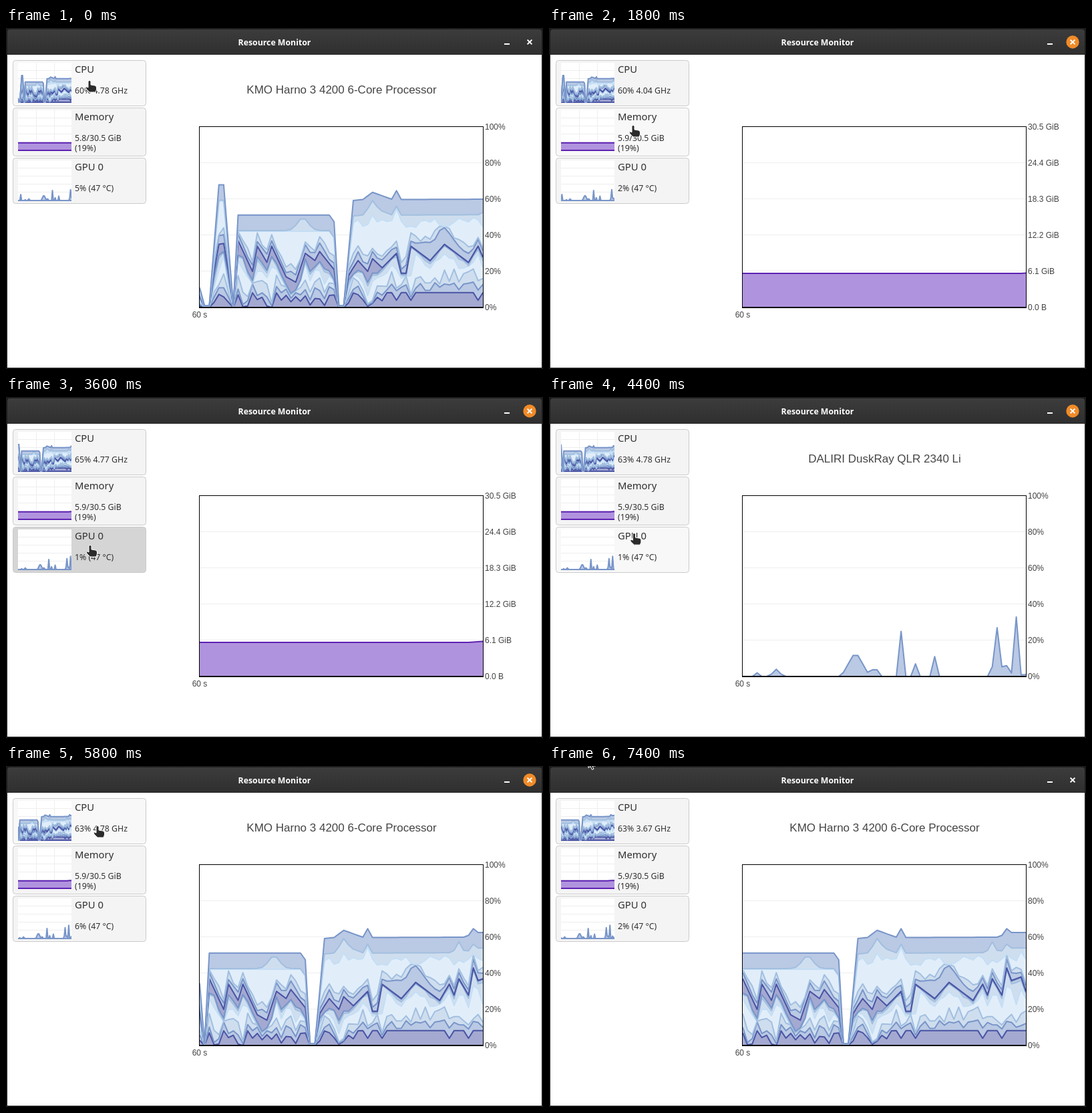
Animation of 804 by 510 pixels, one loop 7.5 s. Source, as an HTML page:

```html
<!DOCTYPE html>
<html lang="en">
<head>
<meta charset="utf-8">
<title>Resource Monitor</title>
<style>
  html, body { margin: 0; width: 100%; height: 100%; overflow: hidden; background: #1b1b1b; }
  svg { display: block; }
  .ui { font-family: "Noto Sans", sans-serif; fill: #303030; }
  .plot { font-family: "Liberation Sans", Arial, sans-serif; fill: #444; font-size: 12px; }
</style>
</head>
<body>
<svg id="stage" width="804" height="510" viewBox="0 0 804 510">
  <defs>
    <linearGradient id="bar" x2="0" y2="1">
      <stop stop-color="#3c3c3c"/><stop offset="1" stop-color="#2f2f2f"/>
    </linearGradient>
  </defs>
  <rect width="804" height="510" fill="#1b1b1b"/>
  <path d="M2 40V6q0-4 4-4H798q4 0 4 4V40z" fill="url(#bar)"/>
  <rect x="2" y="39" width="800" height="1" fill="#262626"/>
  <rect x="2" y="40" width="800" height="468" fill="#fff"/>
  <text class="ui" x="402" y="25.5" text-anchor="middle" font-size="12.3" font-weight="600" style="fill:#fff">Resource Monitor</text>
  <rect x="746" y="23" width="8" height="2" fill="#fff"/>
  <circle id="close" cx="784" cy="21" r="9.7" fill="#f08b28"/>
  <path d="M780.6 17.6l6.8 6.8m0-6.8l-6.8 6.8" stroke="#fff" stroke-width="2"/>
</svg>
<script>
const LOOP = 7500, COUNT = 60, TOTAL = 68;
const TICKS = [200, 1200, 2200, 3300, 4300, 5300, 6400, 7400];
const VIEWS = [[0, 0], [1700, 1], [3700, 2], [5800, 0]];
const PRESSES = [[3600, 2], [5700, 0]];
const GHZ = ["4.78", "4.77", "4.04", "4.77", "4.77", "4.78", "4.78", "4.77", "3.67"];
const POINTER = [[800, 125, 79], [1200, 125, 136], [1400, 126, 146], [2300, 126, 146],
  [2400, 126, 151], [2600, 126, 151], [3100, 126, 222], [4300, 126, 222], [5000, 136, 97],
  [5200, 137, 90], [6700, 137, 90], [7400, 59, -10]];

// Line and fill colours.
const DARK = ["#4a54a4", "#a4a9d1"], MED = ["#7895c9", "#bac9e4"];
const LIGHT = ["#a2bfe0", "#cfdeee"], PALE = ["#c4def5", "#e1eefa"];
const VIOLET = ["#5e22b3", "#b093de"];
const RAMP = [DARK, MED, LIGHT, PALE, LIGHT, MED];

// Turning points of the whole load and of its lower half: [sample, percent].
const LOAD = [[0, 11], [1, 1], [2, 1], [4, 68], [5, 68], [7, 1], [8, 51.2], [27, 51.2], [28, 47.5],
  [29, 1], [30, 1], [32, 59.3], [34, 59.8], [36, 63.8], [40, 60], [41, 64.7], [42, 59.8], [61, 60],
  [62, 61], [63, 64.7], [64, 62.6], [67, 62.6]];
const HALF = [[4, 35], [8, 37], [11, 20], [12, 34], [14, 25], [15, 34], [18, 17], [20, 14], [22, 30],
  [24, 26], [25, 31], [28, 21], [32, 22], [33, 26], [35, 20], [36, 27], [38, 22], [41, 30], [42, 19],
  [43, 19], [44, 34], [48, 26], [51, 35], [56, 25], [58, 34], [59, 28], [60, 37], [62, 28], [63, 43],
  [64, 36], [66, 38], [67, 30]];
// Bursts: [sample, percent, half width].
const BURSTS = [[3, 15, 1], [8, 2, 1], [12, 4, 1.5], [28.5, 14, 3], [32.5, 5.5, 1.5], [38, 25, 1],
  [41, 7, 1], [45, 11, 1], [58, 27, 1.25], [60, 6, 1.5], [62, 33, 1.03], [65, 6, 1.2], [66.5, 2.5, 2.5]];

function at(keys, x, n = 1) {
  let k = 0;
  while (k < keys.length - 2 && keys[k + 1][0] <= x) k++;
  const a = keys[k], b = keys[k + 1];
  return a[n] + (b[n] - a[n]) * Math.min(1, Math.max(0, (x - a[0]) / (b[0] - a[0])));
}

let seed = 11;
const rand = () => (seed = seed * 16807 % 2147483647) / 2147483647;
const between = (lo, hi) => lo + (hi - lo) * rand();
const bump = (x, mid, width) => Math.exp(-(((x - mid) / width) ** 2));

// Twelve stacked core levels for one sample, lowest first.
function cores(i) {
  const top = at(LOAD, i), half = at(HALF, i), late = i > 29;
  const calm = 1 - 0.85 * bump(i, 35.3, 1.7);
  const v = [];
  v[0] = calm * (!late ? between(0, 8.2) : rand() < 0.2 ? 4 : 8.2);
  v[1] = v[0] + calm * between(1, 6);
  v[2] = v[1] + calm * between(1, 8);
  v[5] = half - (i < 38 ? between(3, 8) : 0.4);
  v[4] = v[5] - between(0, 2);
  v[3] = v[2] + (v[4] - v[2]) * between(0.4, 0.9);
  v[6] = half;
  v[7] = half + between(2, 5) + 7 * bump(i, 50, 3.5);
  v[8] = v[7] + between(0.5, 5);
  v[9] = top - (late ? between(10, 17) : 9);
  v[10] = top - 8.6 + 7 * bump(i, 21.5, 1.6) + 4 * bump(i, 36, 1) + 6 * bump(i, 60, 0.8);
  v[11] = top;
  if (top < 40) return v.map((_, k) => top * (k + 1) / 12);
  for (let k = 10; k >= 0; k--) v[k] = Math.min(v[k], v[k + 1]);
  return v;
}

const samples = rule => Array.from({ length: TOTAL }, (_, i) => rule(i));
const cpu = samples(cores);
const gpu = samples(i => Math.max(0, ...BURSTS.map(([mid, h, w]) => h * (1 - Math.abs(i - mid) / w))));
const mem = samples(i => 18.9 + Math.min(0.5, 0.2 * Math.max(0, i - 60)));
const SETS = [
  cpu[0].map((_, k) => [cpu.map(v => v[k]), RAMP[k % 6]]),
  [[mem, VIOLET]],
  [[gpu, MED]]
];

const stage = document.getElementById("stage"), closeDot = document.getElementById("close");
function add(tag, attrs, parent = stage, text = "") {
  const el = document.createElementNS("http://www.w3.org/2000/svg", tag);
  for (const name in attrs) el.setAttribute(name, attrs[name]);
  el.textContent = text;
  parent.append(el);
  return el;
}

// A plot box; each curve fills the band down to the one below it.
function makePlot(x, y, w, h, rows, cols) {
  const id = "clip" + x + "_" + y;
  add("rect", { x, y, width: w, height: h + 1 }, add("clipPath", { id }));
  add("rect", { x, y, width: w, height: h, fill: "#fff" });
  for (let r = 1; r < rows; r++)
    add("rect", { x, y: Math.round(y + h * r / rows) - 1, width: w, height: 1, fill: "#eee" });
  for (const cx of cols) add("rect", { x: cx, y, width: 1, height: h, fill: "#eee" });
  const group = add("g", { "clip-path": `url(#${id})`, "stroke-width": 2, "stroke-linejoin": "round" });
  const floor = [[x, y + h], [x + w, y + h]];
  return (set, shift) => {
    group.replaceChildren();
    const lines = set.map(([row]) => row.slice(shift, shift + COUNT)
      .map((v, i) => [x + i * w / (COUNT - 1), y + h * (1 - v / 100)]));
    lines.forEach((line, k) => {
      const below = k ? lines[k - 1] : floor;
      add("polygon", { points: [...line, ...[...below].reverse()].join(" "), fill: set[k][1][1] }, group);
    });
    const stroke = (line, color) => add("polyline", { points: line.join(" "), fill: "none", stroke: color }, group);
    stroke(floor, set[0][1][0]);
    lines.forEach((line, k) => stroke(line, set[k][1][0]));
  };
}

const CARDS = [["CPU", 48, 69, 52, 59, 5, [45, 72]], ["Memory", 119, 73, 123, 60, 5, [45, 72]],
  ["GPU 0", 194, 69, 198, 60, 5, []]];
const cards = CARDS.map(([name, top, height, plotTop, plotHeight, rows, cols]) => {
  const box = add("rect", { x: 10.5, y: top + 0.5, width: 199, height: height - 1, rx: 4, stroke: "#cbcbcb" });
  const draw = makePlot(18, plotTop, 80, plotHeight, rows, cols);
  add("text", { class: "ui", x: 103, y: top + 19, "font-size": 14.8 }, stage, name);
  const label = add("text", { class: "ui", x: 103, y: top + 50, "font-size": 12.3 });
  return { top, height, box, draw, label };
});
add("text", { class: "ui", x: 103, y: 184, "font-size": 12.3 }, stage, "(19%)");

const drawMain = makePlot(290, 148, 424, 270, 5, []);
add("rect", { x: 289.5, y: 147.5, width: 425, height: 270, fill: "none", stroke: "#000" });
add("rect", { x: 289, y: 417, width: 426, height: 2, fill: "#000" });
add("text", { class: "plot", x: 290, y: 433, "text-anchor": "middle" }, stage, "60 s");
const heading = add("text", { class: "plot", x: 502.5, y: 98, "text-anchor": "middle", style: "font-size:17px" });
const axis = [0, 1, 2, 3, 4, 5].map(r => add("text", { class: "plot", x: 717, y: 152 + 54 * r }));
const HEADINGS = ["KMO Harno 3 4200 6-Core Processor", "", "DALIRI DuskRay QLR 2340 Li"];

const skin = { fill: "#2b2b2b", stroke: "#fff", "stroke-width": 1, "stroke-linejoin": "round" };
const hand = add("path", { ...skin,
  d: "M-2 1.5Q-2-.5 0-.5T2 1.5V6l6 1q2.5.5 2.5 3v3L9 17H0l-5-5q-1.5-2.5.5-3l2.5 1z" });
const arrow = add("path", { ...skin, d: "M0 0V13l3-2.5 2.5 5 2.5-1-2-4.5h4.5z" });

const latest = (steps, t) => steps.filter(s => s[0] <= t).pop()[1];

function showData(shift, view) {
  const end = COUNT - 1 + shift;
  drawMain(SETS[view], shift);
  cards.forEach((card, i) => card.draw(SETS[i], shift));
  cards[0].label.textContent = `${Math.round(cpu[end][11])}% ${GHZ[shift]} GHz`;
  cards[1].label.textContent = `${shift < 2 ? "5.8" : "5.9"}/30.5 GiB`;
  cards[2].label.textContent = `${Math.round(gpu[end])}% (47 °C)`;
  heading.textContent = HEADINGS[view];
  axis.forEach((el, r) => {
    const part = 5 - r;
    el.textContent = view !== 1 ? part * 20 + "%" : part ? (part * 6.1).toFixed(1) + " GiB" : "0.0 B";
  });
}

let shown = "";
function frame() {
  const t = performance.now() % LOOP;
  const shift = TICKS.filter(s => s <= t).length, view = latest(VIEWS, t);
  if (shown !== shift + "/" + view) {
    shown = shift + "/" + view;
    showData(shift, view);
  }
  const step = Math.floor(t / 100) * 100;
  const x = at(POINTER, step, 1), y = at(POINTER, step, 2);
  const pressed = PRESSES.find(([s]) => t >= s && t < s + 100);
  cards.forEach((card, i) => {
    const over = y >= card.top && y < card.top + card.height;
    card.box.setAttribute("fill", pressed && pressed[1] === i ? "#d5d5d5" : over ? "#f8f8f8" : "#f4f4f4");
  });
  const inside = y > 45;
  hand.setAttribute("visibility", inside ? "visible" : "hidden");
  arrow.setAttribute("visibility", inside ? "hidden" : "visible");
  (inside ? hand : arrow).setAttribute("transform", `translate(${x} ${y})`);
  closeDot.setAttribute("visibility", t >= 1800 && t < 7100 ? "visible" : "hidden");
  requestAnimationFrame(frame);
}
frame();
</script>
</body>
</html>
```
